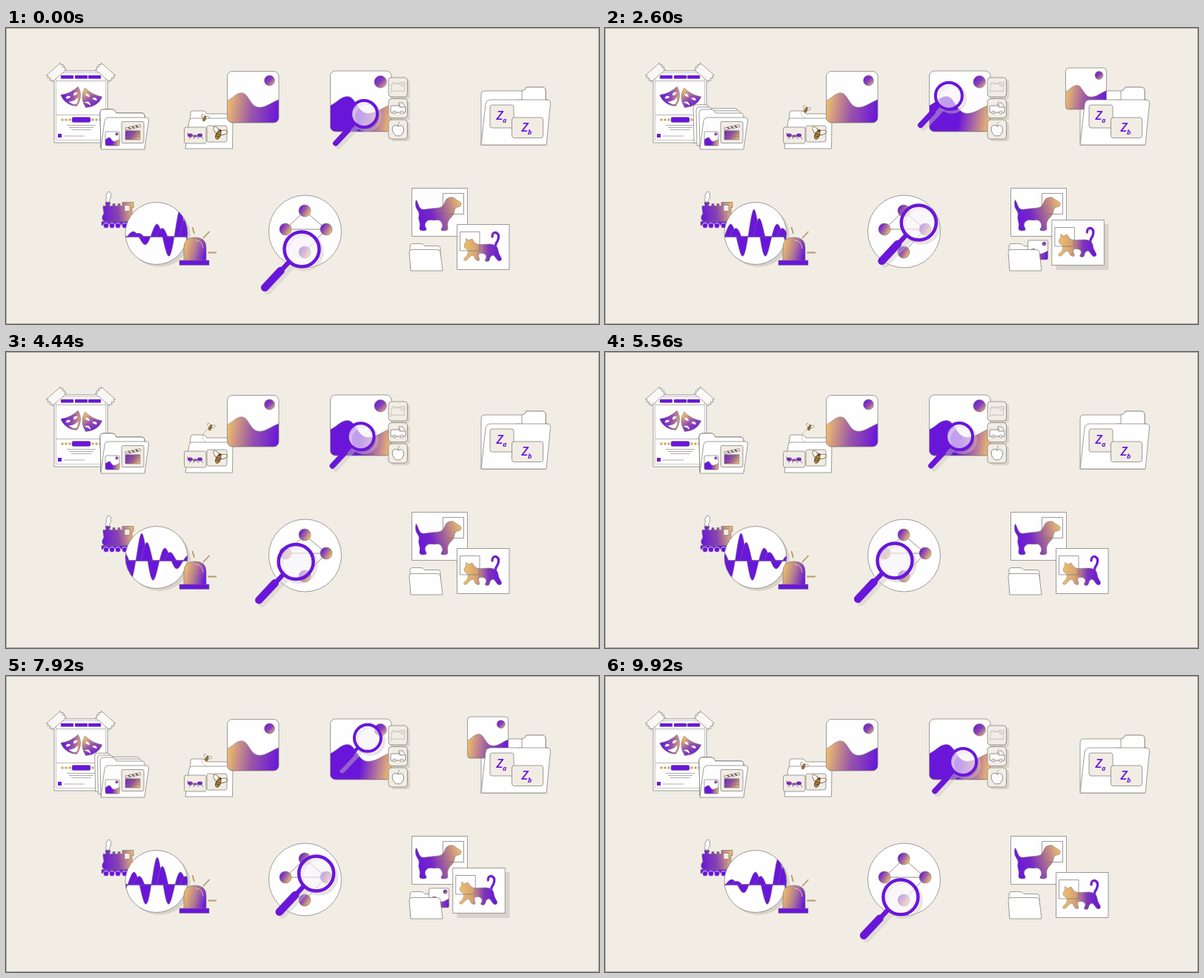
An HTML page with a canvas for the animation above (9.96 s loop, 800x400 px).

```html
<!DOCTYPE html>
<html lang="en">
<head>
<meta charset="utf-8">
<title>Icons</title>
<style>
html, body { margin: 0; width: 100%; height: 100%; overflow: hidden; background: #f1ede5; }
canvas { display: block; width: 100vw; height: 100vh; }
</style>
</head>
<body>
<canvas id="stage" width="800" height="400"></canvas>
<script>
const c = document.getElementById('stage').getContext('2d');
const LOOP = 9960, STEP = 40;
const BG = '#f1ede5', WHITE = '#fefefe', PURPLE = '#6a16da', GOLD = '#efbf6c', LINE = '#77736e', SHADE = '#d8d3cb';

// Smooth monotone interpolation through [time, value] keys.
function track(...keys) {
  const slope = i => (keys[i + 1][1] - keys[i][1]) / (keys[i + 1][0] - keys[i][0]);
  const tangent = i => {
    if (i === 0 || i === keys.length - 1) return 0;
    const a = slope(i - 1), b = slope(i);
    return a * b <= 0 ? 0 : 2 * a * b / (a + b);
  };
  return t => {
    if (t <= keys[0][0]) return keys[0][1];
    const i = keys.findIndex(k => k[0] > t) - 1;
    if (i < 0) return keys[keys.length - 1][1];
    const d = keys[i + 1][0] - keys[i][0], u = (t - keys[i][0]) / d, v = 1 - u;
    return keys[i][1] * (1 + 2 * u) * v * v + tangent(i) * d * u * v * v
      + keys[i + 1][1] * u * u * (3 - 2 * u) - tangent(i + 1) * d * u * u * v;
  };
}

const motion = {
  stack: track([450, 0], [1080, .32], [1600, .68], [2400, 1], [3080, .9], [3520, .62], [4250, 0]),
  photo: track([550, 0], [1080, 15], [1600, 27], [2350, 34], [3080, 31], [3520, 20], [4050, 0]),
  catLift: track([500, 0], [1080, .72], [1600, 1], [2300, 1.05], [3080, .92], [3520, .26], [4000, 0]),
  snap: track([500, 0], [1080, .72], [1600, 1], [2300, 1.05], [3080, .96], [3520, .55], [4050, 0]),
  lensX: track([0, 483], [1080, 501], [1600, 499], [3080, 452], [3520, 451], [4400, 478], [4980, 483]),
  lensY: track([0, 116], [1080, 84], [1600, 81], [3080, 97], [3520, 99], [4400, 114], [4980, 116]),
  scanX: track([0, 399], [1000, 370.5], [1600, 392], [2300, 427], [3080, 410], [3520, 395], [4400, 391], [4980, 399]),
  scanY: track([0, 299], [1080, 267], [2300, 267], [3080, 251], [3520, 244], [4400, 282], [4980, 299]),
  wave: track([-600, 246], [0, 235], [1080, 213.5], [1600, 207], [3080, 198], [3520, 194], [4400, 183.5], [4980, 178]),
  beeX: track([0, 268], [1080, 270], [1600, 271], [3080, 271.5], [3520, 275], [4980, 276]),
  beeY: track([0, 122], [1080, 118], [1600, 112.5], [3080, 109], [3520, 105], [4980, 101])
};

function draw(shape, fill, stroke = LINE, width = .7) {
  const p = typeof shape === 'string' ? new Path2D(shape) : shape;
  if (fill) { c.fillStyle = fill; c.fill(p); }
  if (stroke) { c.strokeStyle = stroke; c.lineWidth = width; c.stroke(p); }
}
function box(x, y, w, h, r = 0) {
  const p = new Path2D();
  p.roundRect(x, y, w, h, r);
  return p;
}
function oval(x, y, rx, ry = rx, turn = 0) {
  const p = new Path2D();
  p.ellipse(x, y, rx, ry, turn, 0, 7);
  return p;
}
function blend(x0, y0, x1, y1, ...stops) {
  const g = c.createLinearGradient(x0, y0, x1, y1);
  stops.forEach((s, i) => g.addColorStop(i / (stops.length - 1), s));
  return g;
}
function at(x, y, turn, scale, body) {
  c.save();
  c.translate(x, y);
  c.rotate(turn);
  c.scale(scale, scale);
  body();
  c.restore();
}
// Closed curve rounding the corners of a polygon.
function blob(pts) {
  const p = new Path2D(), n = pts.length;
  const mid = i => [(pts[i % n][0] + pts[(i + 1) % n][0]) / 2, (pts[i % n][1] + pts[(i + 1) % n][1]) / 2];
  p.moveTo(...mid(0));
  for (let i = 1; i <= n; i++) p.quadraticCurveTo(...pts[i % n], ...mid(i));
  return p;
}

function landscape(x, y, w, h, r, left, right) {
  const card = box(x, y, w, h, r);
  draw(card, WHITE, null);
  c.save();
  c.clip(card);
  const px = k => x + w * k, py = k => y + h * k, hill = new Path2D();
  hill.moveTo(x, py(.57));
  hill.bezierCurveTo(px(.1), py(.53), px(.17), py(.42), px(.28), py(.42));
  hill.bezierCurveTo(px(.42), py(.42), px(.44), py(.7), px(.62), py(.7));
  hill.bezierCurveTo(px(.76), py(.7), px(.84), py(.61), px(1), py(.55));
  hill.lineTo(px(1), py(1));
  hill.lineTo(x, py(1));
  draw(hill, blend(x, y + h * .6, x + w, y + h * .75, left, left === GOLD ? '#9854aa' : PURPLE, right), LINE, .5);
  const d = w * .1, sx = px(.82), sy = py(.18);
  draw(oval(sx, sy, d), blend(sx - d, sy - d, sx + d, sy + d, PURPLE, '#8840b8', GOLD), LINE, .5);
  c.restore();
  draw(card);
}

function lens(x, y, r, ring, grip) {
  const reach = r * 2.12, k = r * .76;
  c.lineCap = 'round';
  const handle = `M${x - k} ${y + k}L${x - reach} ${y + reach * 1.04}`;
  at(4, 4, 0, 1, () => {
    c.globalAlpha = .45;
    draw(handle, null, '#c9c4bd', grip);
    draw(oval(x, y, r), null, '#c9c4bd', ring);
    c.globalAlpha = 1;
  });
  draw(oval(x, y, r), 'rgba(248,244,250,.62)', null);
  draw(`M${x - k} ${y + k}L${x - reach * .6} ${y + reach * .62}`, null, PURPLE, grip * .6);
  draw(`M${x - reach * .57} ${y + reach * .58}L${x - reach} ${y + reach * 1.04}`, null, PURPLE, grip);
  c.lineCap = 'butt';
  draw(oval(x, y, r), null, PURPLE, ring);
}

function mask(x, y, turn, smile) {
  at(x, y, turn, 1, () => {
    draw('M-13 -9Q0 -5 13 -9Q14 6 0 14Q-14 6 -13 -9Z', blend(-12, -6, 12, 8, smile ? PURPLE : GOLD, '#9150ae', smile ? GOLD : PURPLE), LINE, .5);
    draw('M-9 -2Q-5 -6 -2 -1Q-6 1 -9 -2ZM2 -1Q5 -6 9 -2Q6 1 2 -1Z', WHITE, null);
    draw(smile ? 'M-7 4Q0 7 7 4Q3 11 0 11Q-4 10 -7 4Z' : 'M-5 9Q0 2 5 9Q0 7 -5 9Z', WHITE, null);
  });
}

function tape(x, y, turn) {
  at(x, y, turn, 1, () =>
    draw('M-13 -6L13 -6L11 -4L14 -2L11 0L14 2L11 4L13 6L-13 6L-11 4L-14 2L-11 0L-14 -2L-11 -4Z', '#faf8f4', LINE, .6));
}

function poster() {
  draw(box(65, 58, 72, 97), WHITE);
  draw(box(67.5, 60.5, 67, 91), null, LINE, .4);
  [74, 93, 111].forEach(x => draw(box(x, 64, 17, 4.5, 1), PURPLE, LINE, .3));
  draw('M68 71.5H134M68 117.5H134', null, LINE, .5);
  mask(114, 95, .48, false);
  mask(89.5, 93, -.45, true);
  [76, 81, 86, 117, 122, 127].forEach(x => draw(oval(x, 124, 1.7), '#c3a765', null));
  draw(box(89, 120.5, 25, 7, 2), PURPLE, LINE, .4);
  draw('M82 131.5H121M85 134.5H118M88 137.5H115M78 146H106', null, '#9c9996', .8);
  draw(box(70, 143, 5, 5), PURPLE, null);
  tape(68, 60, -.72);
  tape(134, 60, .72);
}

function mediaFolder(t) {
  const p = motion.stack(t);
  for (let i = 2; i >= 0; i--) {
    at(-4 * p * i, -3.2 * p * i, 0, 1, () =>
      draw('M128 162L127 114Q127 110 131 110H144Q147 110 149 115H183Q187 115 187 120V162Z', WHITE));
  }
  draw('M128 164L133 125Q134 121 138 121H189Q193 121 192.5 125L187 164Z', WHITE);
  draw(box(156, 126.5, 30, 29, 2), BG);
  landscape(134, 140, 19, 19, 2, PURPLE, GOLD);
  draw(box(161, 139, 20, 12), blend(160, 138, 180, 152, PURPLE, '#925098', GOLD), LINE, .5);
  draw('M161 142.5H181M161 146.5H181', null, LINE, .5);
  draw('M160.500 135L181 130.500L182 133.500L161.500 138ZM161 138.800H181', '#eee3cf', LINE, .6);
  draw('M165 134L168 136.500M170 133L173 135.300M175 131.800L178 134.300', null, '#5d4368', 1.5);
}

function bee(x, y, s) {
  at(x, y, .4, s, () => {
    draw(oval(-3, -2, 4, 2, .6), '#faf5e8', '#786344', .6);
    draw(oval(3, -2.500, 4, 2, -.6), '#faf5e8', '#786344', .6);
    draw(oval(0, 1.2, 2.1, 4), '#b98c42', '#57452f', .6);
    draw('M-2 .500H2M-2 2.500H2', null, '#57452f', .8);
    draw(oval(0, -3, 1.4), '#67503b', null);
  });
}

function insects(t) {
  draw('M246 160L249 115Q249 112 252 112H266Q269 112 271 116H297Q300 116 300 121V160Z', WHITE);
  const x = motion.beeX(t), y = motion.beeY(t);
  c.setLineDash([1.5, 1.3]);
  draw(`M270 122Q259 114 ${x - 2} ${y + 1}`, null, LINE, .7);
  c.setLineDash([]);
  draw('M242 163L247 126Q247 122 251 122H306L305.500 163Z', WHITE);
  draw(box(240.500, 134, 29.500, 22, 2.500), BG);
  draw(box(271, 132, 27, 22, 2.500), BG);
  draw('M251 146L247 150M254 146L253 150M257 146L260 150M262 145L266 150M248 144L244 142', null, '#59336f', .7);
  draw(oval(248.500, 145, 3.500, 2.400), blend(245, 145, 252, 145, PURPLE, '#8a477c'), null);
  draw(oval(255, 146, 3, 1.700), '#8653a0', null);
  draw(oval(261.500, 145, 3.500, 2.400), '#6e2eaf', null);
  bee(287, 143, 1.5);
  bee(x, y, .85);
  landscape(298.500, 58.500, 69.500, 69.500, 7, GOLD, PURPLE);
}

function steamEngine(fill, stroke, wheel) {
  draw('M2 16V13H6L5 8H12L10.500 13H15V10H18V13H22V10H25V13H28V8H43V15H41V34H4Q0 32 1 27L3 23Z', fill, stroke, .7);
  draw('M31 12H38V20H31Z', BG, stroke, .6);
  draw('M0 34H42L40 39H0Z', wheel, stroke, .6);
  [6, 14, 22, 31, 39].forEach(x => draw(oval(x, 39.500, 3.700), wheel, BG, .8));
}

function gallery(t) {
  landscape(437.500, 58, 82.500, 82, 7, PURPLE, GOLD);
  [67, 95.500, 124].forEach(y => {
    draw(box(519.500, y + 3, 25.500, 26, 4), SHADE, null);
    draw(box(516, y, 25.500, 26, 4), BG);
  });
  at(519, 70, 0, .45, () => steamEngine(BG, LINE, BG));
  draw('M520 105H530V101H535L539 107V114H519V106ZM531 103V107H538', WHITE, LINE, .8);
  draw(oval(524, 114, 2), WHITE);
  draw(oval(534, 114, 2), WHITE);
  draw('M529 133Q524 129 521.500 134Q520 140 525 145Q527 147 529 145.500Q532 147 534 144Q538 139 536 134Q533 130 529 133ZM529 133Q528 129 531 127', WHITE, LINE, .8);
  lens(motion.lensX(t), motion.lensY(t), 18, 4, 7.500);
}

function letterFolder(t) {
  const p = motion.photo(t);
  const back = 'M641 158V90Q641 85 646 85H697Q701 84 702 80H723Q728 80 728 85V158Z';
  draw(back, WHITE);
  if (p > 0) landscape(655 - p, 87.500 - p, 55, 56, 4, GOLD, PURPLE);
  draw('M641 158L647 103Q648 97 654 97H730Q735 97 734.500 102L729 158Z', WHITE);
  // The tab stays in front of the sliding photo.
  draw('M696 97V85Q701 84 702 80H723Q728 80 728 85V97', WHITE);
  draw('M690 97.500H728', null, WHITE, 1.5);
  draw('M690 97H730', null);
  draw(box(653, 104, 32, 31, 3), BG);
  draw(box(682.500, 121, 42, 27.500, 3), BG);
  c.fillStyle = PURPLE;
  const mark = (x, y, sub) => {
    c.font = 'italic 600 17px "Open Sans", sans-serif';
    c.fillText('Z', x, y);
    c.font = 'italic 700 9px "Open Sans", sans-serif';
    c.fillText(sub, x + 8.500, y + 4);
  };
  mark(661.500, 124, 'a');
  mark(695.500, 139.500, 'b');
}

const swell = u => 37 * Math.cos(Math.PI * u / 16) * Math.exp(-(Math.hypot(u, 4) - 4) / 36);

function sound(t) {
  at(129, 227.500, 0, 1, () => {
    steamEngine(blend(0, 20, 43, 14, PURPLE, '#8846ae', GOLD), LINE, PURPLE);
    draw('M6 7Q4 4 7 2Q4 -1 7 -3Q7 -7 11 -6Q14 -4 12 -1Q14 2 11 4Q11 7 9 8Z', WHITE);
  });
  const disc = oval(203, 277.500, 42);
  draw(oval(207, 281, 42), SHADE, null);
  draw(disc, WHITE, null);
  c.save();
  c.clip(disc);
  const peak = motion.wave(t);
  const curve = f => {
    const p = new Path2D();
    p.moveTo(160, 282);
    for (let x = 160; x <= 246; x++) p.lineTo(x, 282 - f(x - peak));
    p.lineTo(246, 282);
    p.closePath();
    return p;
  };
  draw(curve(swell), PURPLE, LINE, .5);
  draw(curve(u => Math.max(0, swell(u - 7) * .67)), blend(0, 257, 4, 283, GOLD, '#b5799b', PURPLE), LINE, .5);
  draw('M160 282H246', null, PURPLE, 1.2);
  c.restore();
  draw(disc);
  draw('M240 315V297Q240 283 255 283Q270 283 270 297V315Z', blend(240, 296, 270, 304, GOLD, '#b37b91', PURPLE));
  draw('M256 287Q265 287 266 298', null, '#f5dfbd', .7);
  draw(box(234, 314, 40, 6.500), PURPLE, LINE, .5);
  draw('M251.500 269L254 278M266 284L274.500 275M272.500 303.500H284', null, '#b79b69', 1.8);
}

function graph(t) {
  draw(oval(403.500, 275, 49), WHITE);
  draw('M377 272L403 247L432 272ZM432 272L403 303', null, LINE, .8);
  [[403, 247], [377, 272], [432, 272], [403, 303]].forEach(([x, y]) =>
    draw(oval(x, y, 8), blend(x - 7, y - 4, x + 7, y + 4, PURPLE, '#a2659e', GOLD), LINE, .6));
  lens(motion.scanX(t), motion.scanY(t), 23.500, 4.500, 10.500);
}

const dog = blob([[553, 230], [556, 238], [560, 246], [571, 244], [587, 243], [591, 238], [594, 230], [603, 228], [607, 232],
  [615, 236], [613, 242], [606, 242], [604, 253], [598, 258], [595, 265], [597, 274], [585, 274], [590, 268], [586, 259],
  [578, 260], [569, 259], [564, 266], [569, 274], [557, 274], [559, 265], [556, 257], [558, 250], [552, 242]]);
const cat = blob([[620, 283], [624, 288], [629, 284], [631, 289], [636, 293], [648, 292], [658, 292], [664, 297], [664, 304],
  [670, 313], [664, 316], [658, 306], [653, 309], [652, 316], [645, 315], [649, 309], [645, 304], [636, 305], [640, 315],
  [633, 314], [631, 306], [625, 309], [621, 315], [616, 313], [623, 307], [624, 300], [618, 297], [618, 292], [621, 289]]);

function pets(t) {
  draw(box(547.500, 216.500, 75, 65), WHITE);
  draw(dog, blend(554, 260, 615, 240, PURPLE, '#7526c8', '#ad718f', GOLD), LINE, .5);
  draw(box(589.500, 223.500, 28, 28), null);

  const lift = motion.catLift(t);
  if (lift > .02) draw(box(608.500, 265, 71, 62), SHADE, null);
  at(-5.500 * lift, -5.800 * lift, 0, 1, () => {
    draw(box(608.500, 265.500, 70.500, 61), WHITE);
    const coat = blend(618, 295, 667, 295, GOLD, '#d7a373', '#7e36bb', PURPLE);
    c.lineCap = 'round';
    draw('M656 282Q656 276 661 276.500Q667 279 663 288Q659 293 661 299', null, coat, 3.300);
    c.lineCap = 'butt';
    draw(cat, coat, LINE, .5);
    draw(box(612.500, 275.500, 26.500, 25.500), null);
  });

  draw('M546 326L545 295Q545 291.500 548 291.500H560Q563 291.500 565 294.500H583Q586 294.500 586 299V326Z', WHITE);
  const s = motion.snap(t);
  if (s > .05) landscape(556 + 14 * s, 302 - 14.500 * s, 27, 26, 2, GOLD, PURPLE);
  draw('M546 328L544 303Q544 299.500 547 299.500H582Q585.500 299.500 586 303L589 328Z', WHITE);
}

function render(now) {
  const clock = Math.floor((now % LOOP) / STEP) * STEP;
  const t = Math.min(clock, LOOP - clock); // forward, then back again
  c.fillStyle = BG;
  c.fillRect(0, 0, 800, 400);
  poster();
  mediaFolder(t);
  insects(t);
  gallery(t);
  letterFolder(t);
  sound(t);
  graph(t);
  pets(t);
  draw(box(.5, .5, 799, 399), null, '#aaa7a1', 1);
}

let start;
function tick(now) {
  start ??= now;
  render(now - start);
  requestAnimationFrame(tick);
}
render(0);
requestAnimationFrame(tick);
</script>
</body>
</html>
```
